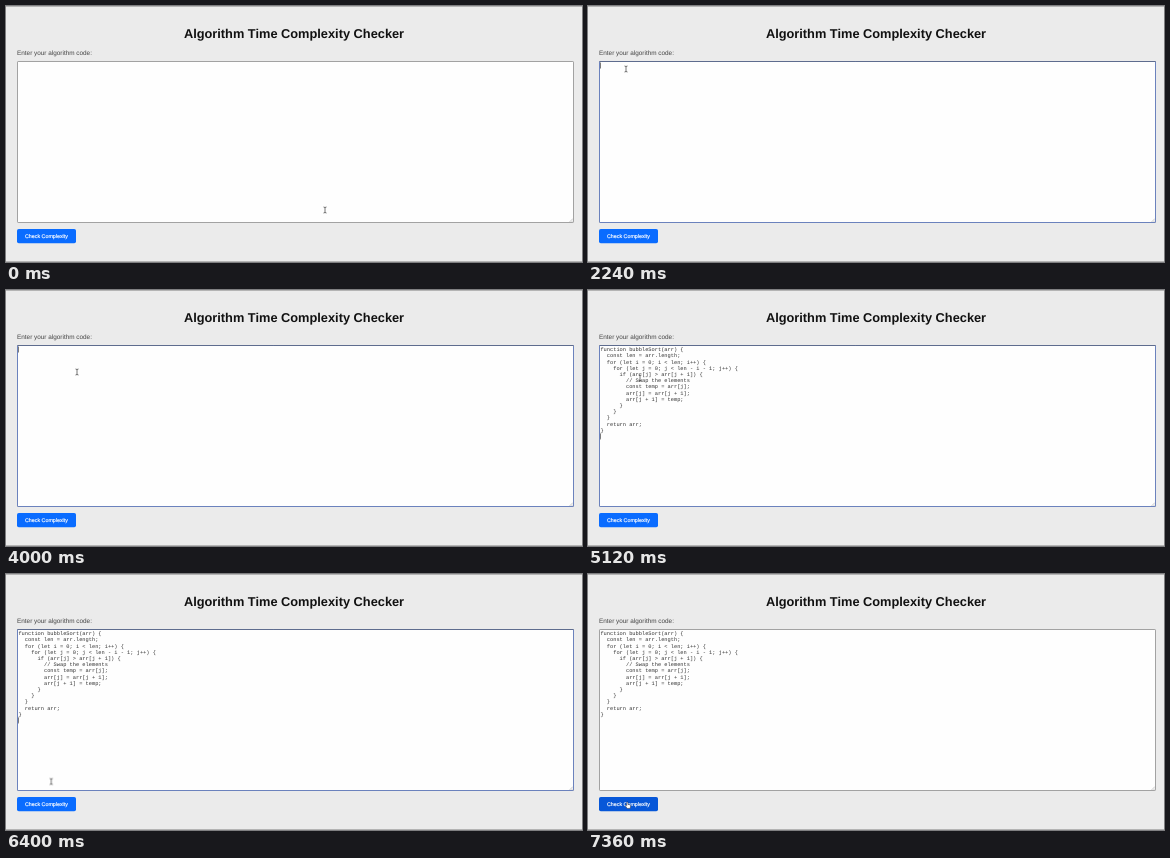
These frames come from a looping animation (576x256 px, 8 s). An HTML page:

```html
<!DOCTYPE html>
<html lang="en">
<head>
<meta charset="utf-8">
<title>Algorithm Time Complexity Checker</title>
<style>
  html, body { margin: 0; width: 100%; height: 100%; overflow: hidden; background: #ebebeb; }
  svg { display: block; }
  text { font-family: "Liberation Sans", Arial, sans-serif; text-rendering: geometricPrecision; }
  #code text { font: 5.333px "Liberation Mono", "Courier New", monospace; white-space: pre; fill: #333; }
</style>
</head>
<body>
<svg width="576" height="256" viewBox="0 0 576 256">
  <rect width="576" height="256" fill="#ebebeb"/>
  <path d="M0 .5H576M0 255.5H576" stroke="#b4b4b4"/>

  <text x="288" y="32" font-size="12.8" font-weight="bold" text-anchor="middle" fill="#111">Algorithm Time Complexity Checker</text>
  <text x="11" y="49.3" font-size="6.4" fill="#444">Enter your algorithm code:</text>

  <rect x="11.5" y="55.5" width="556" height="161" rx=".6" fill="#fefefe" stroke="#a2a2a2"/>
  <path d="M563.5 216L567 212.5M565.5 216L567 214.5" stroke="#999" stroke-width=".5"/>
  <g id="focus" opacity="0">
    <rect x="11.5" y="55.5" width="556" height="161" rx=".6" fill="none" stroke="#6b82bd"/>
    <path d="M11.5 55.5H567.5" stroke="#5e6c8e"/>
  </g>

  <g id="code" opacity="0"></g>
  <g id="caret" opacity="0"><path id="bar" d="M12.5 56.5V62.5" stroke="#444" stroke-width=".7"/></g>

  <rect id="button" x="11" y="223" width="59" height="14.2" rx="1.8" fill="#0a6cff"/>
  <text x="19" y="232" font-size="5.333" fill="#fff" stroke="#fff" stroke-width=".16">Check Complexity</text>

  <g id="pointer">
    <path id="beam" d="M-1.5 -3Q0 -3 0 -2Q0 -3 1.5 -3M0 -2.5V2.5M-1.5 3Q0 3 0 2Q0 3 1.5 3" fill="none" stroke="#555" stroke-width=".8"/>
    <path id="hand" opacity="0" d="M-1.2 -2.6Q-.6 -3.4 0 -2.6V-.6L1.9 -.2Q2.8 0 2.7 .9L2.2 3.4H-.9L-2.7 .7Q-2.5 -.2 -1.2 .6Z" fill="#fff" stroke="#223" stroke-width=".5"/>
  </g>
</svg>
<script>
const LOOP = 8000;
const FOCUS = 2080, PASTE = 4560, HOVER = 6560, BLUR = 7280;

const source = `function bubbleSort(arr) {
  const len = arr.length;
  for (let i = 0; i < len; i++) {
    for (let j = 0; j < len - i - 1; j++) {
      if (arr[j] > arr[j + 1]) {
        // Swap the elements
        const temp = arr[j];
        arr[j] = arr[j + 1];
        arr[j + 1] = temp;
      }
    }
  }
  return arr;
}`;

const $ = id => document.getElementById(id);

source.split("\n").forEach((line, i) => {
  const text = document.createElementNS("http://www.w3.org/2000/svg", "text");
  text.setAttribute("x", 12.4);
  text.setAttribute("y", 61.2 + i * 6.2);
  text.textContent = line;
  $("code").append(text);
});

// steps: [ms, value, easing]; the last value holds to the end of the loop
function play(id, prop, steps, easing) {
  const last = steps[steps.length - 1];
  const frames = [...steps, [LOOP, last[1]]].map(([ms, value, ease]) =>
    ({ offset: ms / LOOP, [prop]: value, easing: ease || easing }));
  $(id).animate(frames, { duration: LOOP, iterations: Infinity });
}
const jump = (id, prop, steps) => play(id, prop, steps, "step-end");

const path = [
  [0, 319, 204], [400, 319, 204], [2000, 38, 63], [2400, 38, 63],
  [3440, 71, 82], [4000, 71, 82], [4640, 52, 88], [5280, 52, 88],
  [5840, 58, 150], [6000, 58, 150], [6640, 40, 231]
];
play("pointer", "transform",
  path.map(([ms, x, y]) => [ms, `translate(${x}px, ${y}px)`]), "ease-in-out");

jump("beam", "opacity", [[0, 1], [HOVER, 0]]);
jump("hand", "opacity", [[0, 0], [HOVER, 1]]);
jump("button", "fill", [[0, "#0a6cff"], [HOVER, "#0757d8"]]);
jump("focus", "opacity", [[0, 0], [FOCUS, 1], [BLUR, 0]]);
jump("code", "opacity", [[0, 0], [PASTE, 1]]);
jump("bar", "transform", [[0, "translate(0px, 0px)"], [PASTE, "translate(0px, 86.8px)"]]);

const blinks = [FOCUS, 2640, 3200, 3520, 3840, 4400, PASTE, 5520, 6080, 6640];
jump("caret", "opacity", [[0, 0], ...blinks.map((ms, i) => [ms, 1 - i % 2])]);
</script>
</body>
</html>
```
